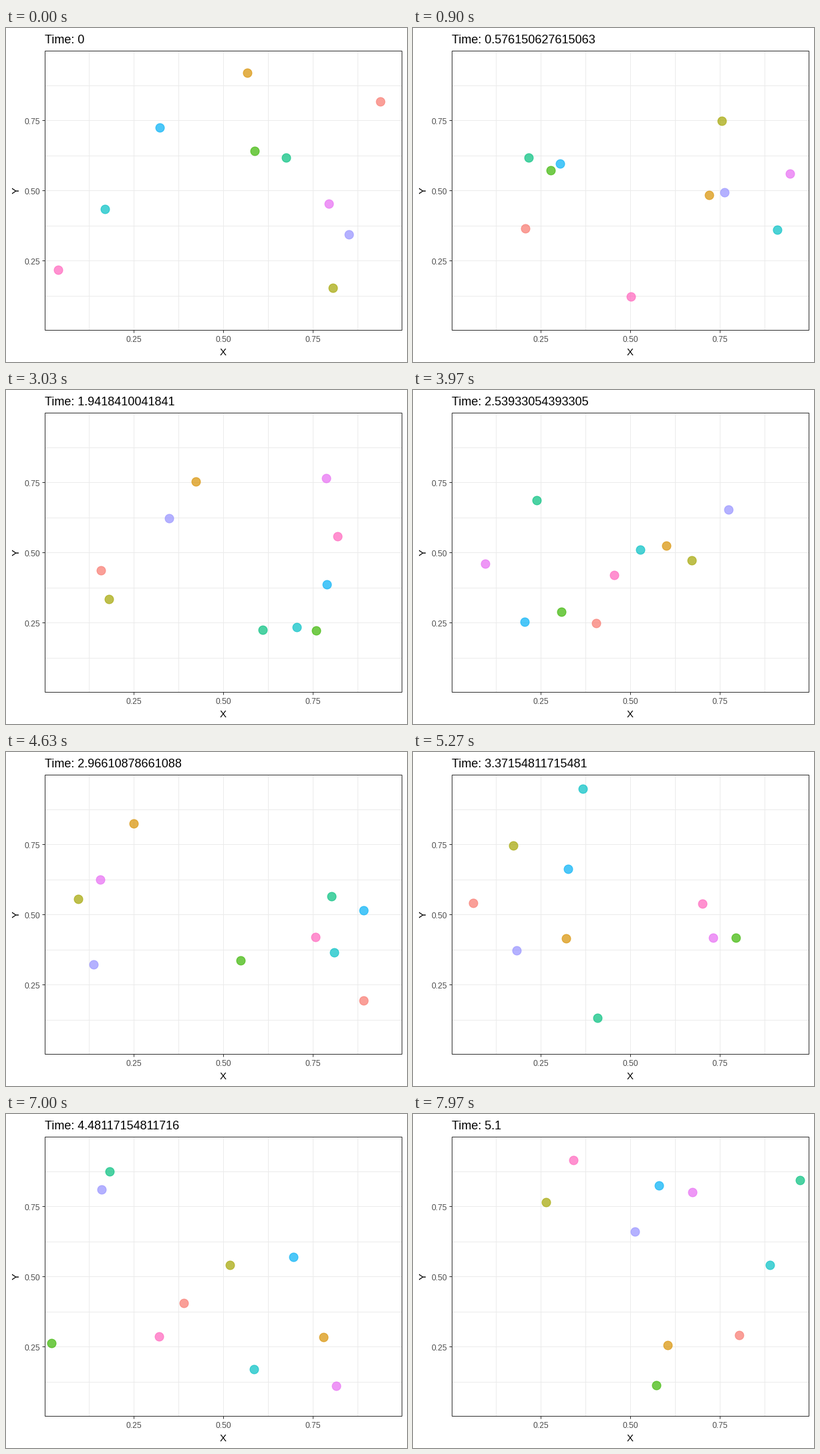
Recreate the animation shown at these times as a matplotlib script. Size 600x500 px, loop 10000 ms.

```python
import numpy as np
import matplotlib.pyplot as plt
from matplotlib.animation import FuncAnimation
from matplotlib.colors import to_rgba
from matplotlib.patches import Rectangle

plt.rcParams["font.family"] = "Liberation Sans"
plt.rcParams["path.snap"] = False  # coordinates below are already pixel centres

WIDTH, HEIGHT, DPI = 600, 500, 100
PT = 72 / DPI
LOOP_MS, INTERVAL = 10000, 25
STEPS_PER_SECOND, LAST_STEP = 30, 239
END_TIME, STATES = 5.1, 52
LEFT, TOP, RIGHT, BOTTOM = 58.5, 34.5, 592.5, 452.5
GRID, DARK, TICK_TEXT = "#EBEBEB", "#333333", "#4D4D4D"

# Colour, start point and resting point of each dot.
DOTS = [
    ("#F8766D", (560, 110), (488, 331)),
    ("#D89000", (361, 67), (381, 346)),
    ("#A3A500", (489, 389), (199, 132)),
    ("#39B600", (372, 184), (364, 406)),
    ("#00BF7D", (419, 194), (579, 99)),
    ("#00BFC4", (148, 271), (534, 226)),
    ("#00B0F6", (230, 149), (368, 107)),
    ("#9590FF", (513, 309), (332, 176)),
    ("#E76BF3", (483, 263), (418, 117)),
    ("#FF62BC", (78, 362), (240, 69)),
]
colors, starts, ends = zip(*DOTS)

# A new random place for every dot each 0.1 time units, joined linearly.
rng = np.random.default_rng(7)
places = rng.uniform((LEFT, TOP), (RIGHT, BOTTOM), (STATES, len(DOTS), 2))
places[0], places[-1] = starts, ends
state_steps = np.rint(np.linspace(0, LAST_STEP, STATES))


def positions(step):
    k = min(np.searchsorted(state_steps, step, side="right") - 1, STATES - 2)
    u = (step - state_steps[k]) / (state_steps[k + 1] - state_steps[k])
    return np.rint((1 - u) * places[k] + u * places[k + 1]) + 0.5


fig = plt.figure(figsize=(WIDTH / DPI, HEIGHT / DPI), dpi=DPI, facecolor="white")
ax = fig.add_axes([0, 0, 1, 1])
ax.set(xlim=(0, WIDTH), ylim=(HEIGHT, 0))
ax.axis("off")


def line(xs, ys, color, z):
    ax.plot(xs, ys, color=color, lw=PT, zorder=z, solid_capstyle="butt")


def label(x, y, text, px, color="black", **kw):
    return ax.text(x, y, text, fontsize=px * PT, color=color, va="baseline", **kw)


def panel(**kw):
    return Rectangle((LEFT, TOP), RIGHT - LEFT, BOTTOM - TOP, **kw)


def pixel_x(value):
    return np.floor(325.5 + 536 * (value - 0.5)) + 0.5


def pixel_y(value):
    return np.floor(243.5 - 420 * (value - 0.5)) + 0.5


for value in np.arange(1, 8) / 8:
    x, y = pixel_x(value), pixel_y(value)
    line([x, x], [TOP, BOTTOM], GRID, 1)
    line([LEFT, RIGHT], [y, y], GRID, 1)

for value in (0.25, 0.5, 0.75):
    x, y = pixel_x(value), pixel_y(value)
    line([x, x], [BOTTOM, BOTTOM + 4], DARK, 4)
    line([LEFT - 4, LEFT], [y, y], DARK, 4)
    label(x, 470, f"{value:.2f}", 12, TICK_TEXT, ha="center")
    label(50.8, y + 5.5, f"{value:.2f}", 12, TICK_TEXT, ha="right")

label(325, 490, "X", 15, ha="center")
label(19.5, 243.5, "Y", 15, ha="center", rotation=90, rotation_mode="anchor")
title = label(58.5, 23, "", 18, ha="left")
ax.add_patch(panel(fill=False, ec=DARK, lw=PT, zorder=5))

rgba = [to_rgba(c, 0.7) for c in colors]
dots = ax.scatter(*positions(0).T, s=(13 * PT) ** 2, facecolors=rgba,
                  edgecolors=rgba, linewidths=PT, zorder=3)
dots.set_clip_path(panel(transform=ax.transData))


def update(frame):
    nearest = int(frame * INTERVAL * STEPS_PER_SECOND / 1000 + 0.5)
    step = min(nearest, LAST_STEP)
    dots.set_offsets(positions(step))
    title.set_text(f"Time: {step * END_TIME / LAST_STEP:.15g}")
    return dots, title


anim = FuncAnimation(fig, update, frames=LOOP_MS // INTERVAL, interval=INTERVAL,
                     repeat=True, repeat_delay=0, blit=False)
plt.show()
```
